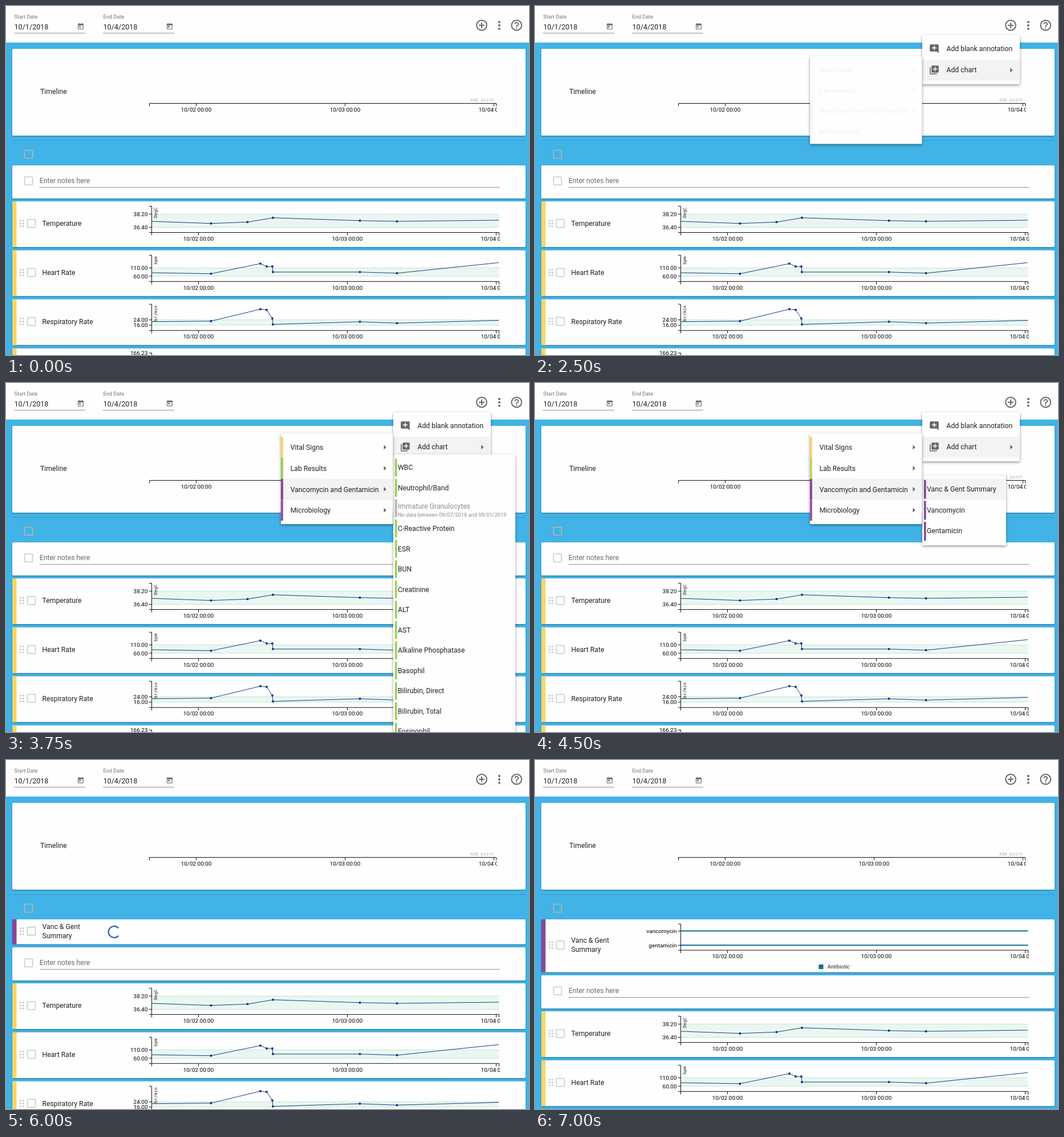
Recreate the animation shown at these times as an HTML page. Size 917 by 611 pixels, loop 7.75 s.

```html
<!DOCTYPE html>
<html lang="en">
<head>
<meta charset="utf-8">
<title>Chart page</title>
<style>
  html, body { margin: 0; width: 100%; height: 100%; overflow: hidden; background: #41b3e6; }
  svg { display: block; font: 12.23px Roboto, sans-serif; fill: #212121; }
  .panel { fill: #fefefe; filter: drop-shadow(0 1px 1.2px rgba(0, 0, 0, .38)); }
  .menu { fill: #fefefe; filter: drop-shadow(0 2px 2.5px rgba(0, 0, 0, .4)); }
  .hover { fill: #f3f3f3; }
  .axis { fill: none; stroke: #111; }
  .small { font-size: 9.93px; fill: #000; }
  .mid { text-anchor: middle; }
  .end { text-anchor: end; }
  .mono { font: 7.7px "DejaVu Sans Mono", monospace; }
  .icon { fill: #666; }
  .rule { stroke: #949494; }
  .box { fill: none; stroke: #cbcbcb; stroke-width: 1.6; }
  .series { fill: none; stroke: #123a8c; }
</style>
</head>
<body>
<svg id="stage" width="917" height="611" viewBox="0 0 917 611"></svg>
<script>
const YELLOW = '#f9d566', GREEN = '#9bd158', PURPLE = '#87479a';
const DAYS = ['10/02 00:00', '10/03 00:00', '10/04 00:00'];

const text = (x, y, s, attrs = '') => `<text x="${x}" y="${y}" ${attrs}>${s}</text>`;
const rect = (x, y, w, h, attrs = '') => `<rect x="${x}" y="${y}" width="${w}" height="${h}" ${attrs}/>`;
const path = (d, attrs = '') => `<path d="${d}" ${attrs}/>`;
const group = (id, body, attrs = '') => `<g id="${id}" ${attrs}>${body}</g>`;
const icon = (x, y, scale, d) => path(d, `class="icon" transform="translate(${x} ${y}) scale(${scale})"`);
const checkbox = (x, y, attrs = '') => rect(x - 7, y - 7, 14, 14, `class="box" rx="1" ${attrs}`);
const panel = (y, h, cls = 'panel') => rect(11, y, 900, h, `class="${cls}" rx="2"`);
const arrow = (x, y) => path(`M${x} ${y - 4}l4.3 4l-4.3 4z`, 'fill="#666"');

// Horizontal time axis; labels are cut at the right edge.
function timeAxis(x0, x1, y) {
  const ticks = DAYS.map((_, i) => x0 + 82 + 261 * i);
  return path(`M${x0} ${y + 5}v-5H${x1}v5` + ticks.map(x => `M${x} ${y}v5`).join(''), 'class="axis"') +
    `<svg width="${x1 + 1.5}" height="900">` +
    ticks.map((x, i) => text(x, y + 14.2, DAYS[i], 'class="small mid"')).join('') + '</svg>';
}

const handle = y => [0, 1, 2, 3, 4, 5].map(i =>
  `<circle cx="${25.3 + i % 2 * 5}" cy="${y - 5 + (i >> 1) * 5}" r="1.5" fill="#c6c6c6"/>`).join('');

function chartFrame(y, labels) {
  return path(`M251 ${y + 8.5}h4.5v46h-4.5` + labels.map(l => `M251 ${y + l[0]}h4.5`).join(''), 'class="axis"') +
    labels.map(l => text(248.5, y + l[0] + 3.6, l[1], 'class="small end"')).join('') +
    timeAxis(255.5, 864.5, y + 54.5);
}

function vitalCard(y, name, unit, labels, xs, ys) {
  const [top, bottom] = labels.map(l => y + l[0]);
  const points = xs.map((x, i) => [x, y + ys[i]]);
  return panel(y, 80) + rect(11, y, 7.5, 80, `fill="${YELLOW}"`) +
    handle(y + 38.7) + checkbox(44.5, y + 38.7) + text(63.5, y + 43, name) +
    rect(256, top, 608.5, bottom - top, 'fill="#eaf7f1"') +
    path(`M256 ${top}h608.5M256 ${bottom}h608.5`, 'stroke="#c3e5d4"') +
    chartFrame(y, labels) +
    text(0, 0, unit, `class="mono end" transform="translate(265 ${y + 10.5}) rotate(-90)"`) +
    path('M' + points.join('L'), 'class="series"') +
    points.slice(1, -1).map(p => `<circle cx="${p[0]}" cy="${p[1]}" r="2" fill="#0b318a"/>`).join('');
}

const header = rect(0, 0, 917, 64, 'fill="#fefefe"') +
  [[15, 'Start Date', '10/1/2018'], [171, 'End Date', '10/4/2018']].map(([x, label, date]) =>
    text(x - .5, 22.2, label, 'font-size="9.2" fill="#757575"') +
    text(x - .5, 40.7, date, 'font-size="12.6"') +
    path(`M${x - 1} 47.5h125`, 'class="rule"') +
    icon(x + 109.3, 29.3, .55, 'M19 3h-1V1h-2v2H8V1H6v2H5c-1.1 0-2 .9-2 2v14c0 1.1.9 2 2 2h14c1.1 0 2-.9 2-2V5c0-1.1-.9-2-2-2zm0 16H5V8h14v11zM7 10h5v5H7z')
  ).join('') +
  icon(822.3, 22, .98, 'M13 7h-2v4H7v2h4v4h2v-4h4v-2h-4V7zm-1-5a10 10 0 1 0 0 20a10 10 0 0 0 0-20zm0 18a8 8 0 1 1 0-16a8 8 0 0 1 0 16z') +
  icon(853.2, 22.2, .98, 'M12 8a2 2 0 1 0 0-4a2 2 0 0 0 0 4zm0 2a2 2 0 1 0 0 4a2 2 0 0 0 0-4zm0 6a2 2 0 1 0 0 4a2 2 0 0 0 0-4z') +
  icon(883.5, 22, .98, 'M11 18h2v-2h-2v2zm1-16a10 10 0 1 0 0 20a10 10 0 0 0 0-20zm0 18a8 8 0 1 1 0-16a8 8 0 0 1 0 16zm0-14c-2.21 0-4 1.79-4 4h2c0-1.1.9-2 2-2s2 .9 2 2c0 2-3 1.75-3 5h2c0-2.25 3-2.5 3-5 0-2.21-1.79-4-4-4z');

const timeline = panel(75, 152) + text(60, 154, 'Timeline') +
  text(814, 167, 'Add point', 'class="mono" fill="#a9b8ab"') + timeAxis(251.5, 859.5, 170.5) +
  path('M11 235.5h900', 'stroke="#379cc9"') + checkbox(39.5, 259.5, 'style="stroke:#bbb5b3"');

const temperatureX = [255, 359.5, 423.5, 468, 620.5, 685.5, 864];
const rateX = [255, 359.5, 446, 457, 467, 468, 620.5, 685.5, 864];
const rows = panel(279, 58) + checkbox(39.5, 306.3) +
  text(58.7, 310.4, 'Enter notes here', 'fill="#6b6b6b"') + path('M59 317.5h807', 'class="rule"') +
  vitalCard(342, 'Temperature', 'DegC', [[22.3, '38.20'], [45.5, '36.40']], temperatureX,
    [35, 38.7, 36.3, 28.8, 33.8, 35, 33]) +
  vitalCard(427.8, 'Heart Rate', 'bpm', [[30.7, '110.00'], [45.2, '60.00']], rateX,
    [39.2, 40.9, 23.2, 28.2, 28.2, 38, 38, 40, 21.5]) +
  vitalCard(513.6, 'Respiratory Rate', 'br/min', [[35.8, '24.00'], [45.2, '16.00']], rateX,
    [39.1, 38.1, 17.2, 18.4, 33.4, 43.8, 39.2, 41.6, 36.8]) +
  panel(599.5, 80) + rect(11, 599.5, 7.5, 80, `fill="${YELLOW}"`) +
  path('M251 607.5h4.5v46', 'class="axis"') + text(248.5, 611, '166.23', 'class="small end"');

const cardHead = (h, mid) => panel(279, h) + rect(11, 279, 7.5, h, `fill="${PURPLE}"`) +
  handle(mid) + checkbox(44.5, mid) + text(63.5, mid - 4, 'Vanc &amp; Gent') + text(63.5, mid + 12, 'Summary');
const loading = cardHead(43.5, 299.6) +
  path('M7.5 -6.6A10 10 0 1 0 7.5 6.6', 'id="spinner" fill="none" stroke="#426cab" stroke-width="2.4"');
const summary = cardHead(92.5, 324) + chartFrame(278.5, [[21, 'vancomycin'], [46, 'gentamicin']]) +
  path('M256 299.3h608.5', 'stroke="#08797f" stroke-width="2"') +
  path('M256 324.3h608.5', 'stroke="#0b6c98" stroke-width="2"') +
  rect(497.5, 358, 8, 8, 'fill="#08718f"') + text(512.7, 365.3, 'Antibiotic', 'font-size="9.2"');

const tooltip = rect(799, 62, 70.5, 19, 'rx="2" fill="#616161" opacity=".94"') +
  text(834.2, 74.3, 'Add card to page', 'class="mid" font-size="7.64" style="fill:#fff"');
const click = '<circle cx="831" cy="31.5" r="15.5" fill="#800080"/>';

const addMenu = rect(679, 51, 171, 86, 'class="menu" rx="1.5"') +
  rect(679, 94, 171, 36.7, 'id="chartHover" class="hover"') +
  icon(690.6, 65.6, .78, 'M22 4c0-1.1-.9-2-2-2H4c-1.1 0-2 .9-2 2v12c0 1.1.9 2 2 2h14l4 4V4zm-5 7h-4v4h-2v-4H7V9h4V5h2v4h4v2z') +
  icon(690.6, 102.6, .78, 'M4 6H2v14c0 1.1.9 2 2 2h14v-2H4V6zm16-4H8c-1.1 0-2 .9-2 2v12c0 1.1.9 2 2 2h12c1.1 0 2-.9 2-2V4c0-1.1-.9-2-2-2zm-1 9h-4v4h-2v-4H9V9h4V5h2v4h4v2z') +
  text(721.5, 79, 'Add blank annotation') + text(721.5, 115.8, 'Add chart') + arrow(833.3, 112.3);

const kinds = [['Vital Signs', YELLOW], ['Lab Results', GREEN], ['Vancomycin and Gentamicin', PURPLE], ['Microbiology', '#9f5598']];
const kindMenu = rect(482, 88, 196.5, 159, 'class="menu" rx="1.5"') +
  group('kindItems', rect(482, 0, 196.5, 36.7, 'id="kindHover" class="hover"') +
    kinds.map(([name, color], i) => {
      const y = 94.3 + 36.7 * i;
      return rect(482, y, 4, 36.7, `fill="${color}"` + (i == 1 ? ' id="labBar"' : '')) +
        text(498.7, y + 23, name) + arrow(662.5, y + 18.3);
    }).join(''));

const labs = ['WBC', 'Neutrophil/Band', 'Immature Granulocytes', 'C-Reactive Protein', 'ESR', 'BUN', 'Creatinine',
  'ALT', 'AST', 'Alkaline Phosphatase', 'Basophil', 'Bilirubin, Direct', 'Bilirubin, Total', 'Eosinophil'];
const labMenu = rect(679, 125, 214, 500, 'class="menu" rx="1.5"') + labs.map((name, i) => {
  const y = 148 + 35.55 * i, empty = i == 2;
  return rect(682, y - 15.5, 3.6, 31, `fill="${empty ? '#bdb5b5' : GREEN}"`) +
    text(687, y + (empty ? .9 : 4.3), name, empty ? 'fill="#8c8c8c"' : '') +
    (empty ? text(687, y + 14.5, 'No data between 09/07/2018 and 09/01/2019', 'font-size="9.25" fill="#8c8c8c"') : '');
}).join('');

const drugMenu = rect(679, 162, 147, 122, 'class="menu" rx="1.5"') +
  group('drugItems', rect(679, 167.5, 147, 36.7, 'id="drugHover" class="hover"') +
    ['Vanc &amp; Gent Summary', 'Vancomycin', 'Gentamicin'].map((name, i) =>
      rect(682, 169.7 + 36.7 * i, 3.6, 33, `fill="${PURPLE}"`) + text(687, 190 + 36.7 * i, name)).join(''));

const $ = id => document.getElementById(id);
$('stage').innerHTML = rect(0, 0, 917, 611, 'fill="#41b3e6"') + header + timeline +
  group('rows', rows) + group('loading', loading) + group('summary', summary) +
  group('tooltip', tooltip) + group('click', click) +
  group('menus', group('addMenu', addMenu) + group('labMenu', labMenu) +
    group('drugMenu', drugMenu) + group('kindMenu', kindMenu));

const show = (id, on) => { $(id).style.display = on ? '' : 'none'; };

function render(now) {
  const t = Math.floor(now % 7750 / 250) * 250;
  const during = (from, to) => t >= from && t < to;

  show('tooltip', during(1000, 1500));
  show('click', during(1250, 1500));
  show('menus', during(1500, 5500));
  $('menus').setAttribute('opacity', t == 5250 ? .5 : 1);
  show('chartHover', t >= 2000);

  // Submenus unfold from the top while their items fade in.
  const unfold = (id, items, top, start) => {
    const opening = t == start;
    show(id, t >= start);
    $(id).setAttribute('transform', opening ? `translate(0 ${top}) scale(1 .965) translate(0 ${-top})` : '');
    $(items).setAttribute('opacity', opening ? .06 : 1);
  };
  unfold('kindMenu', 'kindItems', 88, 2500);
  unfold('drugMenu', 'drugItems', 162, 4000);
  show('labMenu', during(3500, 4000));
  show('kindHover', t >= 3500);
  $('kindHover').setAttribute('y', t < 3750 ? 131 : 167.7);
  $('labBar').setAttribute('fill', during(3500, 4000) ? GREEN : '#cbd35f');
  show('drugHover', t >= 4500);

  show('loading', during(5500, 6250));
  show('summary', t >= 6250);
  $('spinner').setAttribute('transform', `translate(189.7 301) rotate(${(t - 6000) * .36})`);
  $('rows').setAttribute('transform', `translate(0 ${t < 5500 ? 0 : t < 6250 ? 49 : 98})`);
  requestAnimationFrame(() => render(performance.now() - start));
}
const start = performance.now();
render(0);
</script>
</body>
</html>
```
